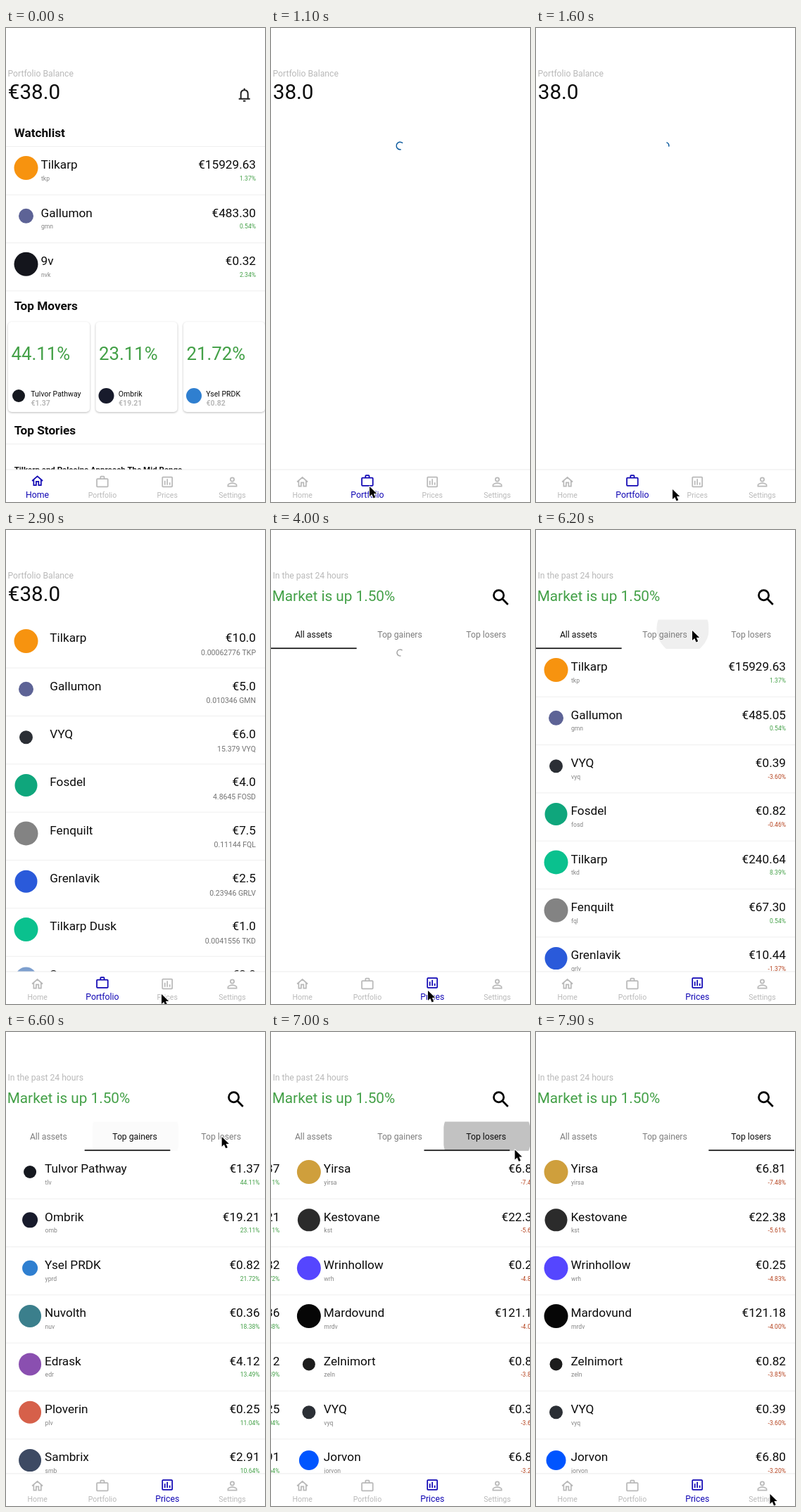
An HTML page with a canvas that plays this animation: 368x674 px, repeating every 8 s.

```html
<!DOCTYPE html>
<html lang="en">
<head>
<meta charset="utf-8">
<title>Portfolio app</title>
<style>
html, body { margin: 0; width: 100%; height: 100%; overflow: hidden; background: #fff; }
canvas { display: block; width: 368px; height: 674px; }
</style>
</head>
<body>
<canvas id="stage"></canvas>
<script>
const W = 368, H = 674, LOOP = 8000, PITCH = 68.35, NAV_TOP = 628;
const canvas = document.getElementById('stage');
const ctx = canvas.getContext('2d');
const ratio = window.devicePixelRatio || 1;
canvas.width = W * ratio;
canvas.height = H * ratio;

const BLACK = '#0c0c0c', GREEN = '#43a047', RED = '#b5431f', BLUE = '#1006b4', PALE = '#b9b9b9';

// Badge per asset: colour and radius
const BADGES = {
  tkp: ['#f7930f', 17], gmn: ['#5d6396', 10.5], nvk: ['#14151c', 17], vyq: ['#2b2f35', 9.5],
  fosd: ['#0fa67c', 16], fql: ['#838383', 17], grlv: ['#2a5ada', 16], tkd: ['#0ac18e', 17],
  srv: ['#7d9fce', 15], yirsa: ['#cf9f3c', 17], kst: ['#2b2b2b', 16], wrh: ['#5546ff', 17],
  mrdv: ['#060606', 17], zeln: ['#1c1c1c', 9], jorvon: ['#0055ff', 14],
  tlv: ['#15181f', 9], omb: ['#181b2c', 11], yprd: ['#2f7fd0', 11],
  nuv: ['#3b7f8c', 16], edr: ['#8a4fb0', 16], plv: ['#d6604a', 16], smb: ['#3d4a63', 16]
};

const table = lines => lines.trim().split('\n').map(line => line.trim().split('|'));

const WATCHLIST = table(`
  Tilkarp|tkp|15929.63|1.37
  Gallumon|gmn|483.30|0.54
  9v|nvk|0.32|2.34`);
const HOLDINGS = table(`
  Tilkarp|tkp|10.0|0.00062776
  Gallumon|gmn|5.0|0.010346
  VYQ|vyq|6.0|15.379
  Fosdel|fosd|4.0|4.8645
  Fenquilt|fql|7.5|0.11144
  Grenlavik|grlv|2.5|0.23946
  Tilkarp Dusk|tkd|1.0|0.0041556
  Sorvane|srv|2.0|21.604`);
const MOVERS = table(`
  Tulvor Pathway|tlv|1.37|44.11
  Ombrik|omb|19.21|23.11
  Ysel PRDK|yprd|0.82|21.72`);
const PAGES = [table(`
  Tilkarp|tkp|15929.63|1.37
  Gallumon|gmn|485.05|0.54
  VYQ|vyq|0.39|-3.60
  Fosdel|fosd|0.82|-0.46
  Tilkarp|tkd|240.64|8.39
  Fenquilt|fql|67.30|0.54
  Grenlavik|grlv|10.44|-1.37`),
  MOVERS.concat(table(`
  Nuvolth|nuv|0.36|18.38
  Edrask|edr|4.12|13.49
  Ploverin|plv|0.25|11.04
  Sambrix|smb|2.91|10.64`)), table(`
  Yirsa|yirsa|6.81|-7.48
  Kestovane|kst|22.38|-5.61
  Wrinhollow|wrh|0.25|-4.83
  Mardovund|mrdv|121.18|-4.00
  Zelnimort|zeln|0.82|-3.85
  VYQ|vyq|0.39|-3.60
  Jorvon|jorvon|6.80|-3.20`)];

// Stroked icons on a 24-unit grid
const ICONS = {
  home: 'M3.4 12 12 4.3l8.6 7.7M6 10v9h4v-6h4v6h4v-9',
  work: 'M4 7h16q1 0 1 1v11q0 1-1 1H4q-1 0-1-1V8q0-1 1-1zM9 7V4q0-1 1-1h4q1 0 1 1v3',
  chart: 'M5 4h14q1 0 1 1v14q0 1-1 1H5q-1 0-1-1V5q0-1 1-1zM8 10v7M12 7v10M16 13v4',
  person: 'M12 5a3 3 0 1 0 0 6 3 3 0 1 0 0-6M5 19v-2c0-1.5 4-3 7-3s7 1.5 7 3v2z',
  bell: 'M4 18h16M7 18v-7c0-3.5 2-5.5 5-5.5s5 2 5 5.5v7M12 5.5V3M10.3 21h3.4',
  search: 'M9.5 4a5.5 5.5 0 1 0 0 11 5.5 5.5 0 1 0 0-11M13.6 13.6l6.1 6.1'
};
const NAV = [['Home', 'home'], ['Portfolio', 'work'], ['Prices', 'chart'], ['Settings', 'person']];
const TABS = ['All assets', 'Top gainers', 'Top losers'];
const TAB_W = W / 3;

// Pointer path: time, x, y
const POINTER = [
  [500, 150, 690], [900, 140, 652], [1150, 140, 652], [1600, 194, 656], [1900, 221, 660],
  [3500, 221, 660], [3800, 223, 655], [4600, 223, 655], [4900, 226, 652], [5050, 226, 652],
  [5850, 222, 143], [6300, 222, 143], [6700, 322, 150], [7000, 346.5, 167.5], [7300, 344, 170],
  [7450, 344, 170], [7900, 332.5, 657], [LOOP, 332.5, 657]
];

const T = { portfolio: 1100, holdings: 1800, prices: 3800, assets: 4600, gainers: 6300, losers: 6765 };

const clamp = v => Math.max(0, Math.min(1, v));
const mix = (a, b, k) => a + (b - a) * k;
const smooth = k => k * k * (3 - 2 * k);
const easeOut = (t, start) => 1 - (1 - clamp((t - start) / 400)) ** 3;

function text(str, x, y, size, color = BLACK, align = 'left', weight = 400) {
  ctx.font = `${weight} ${size}px Roboto, sans-serif`;
  ctx.textAlign = align;
  ctx.fillStyle = color;
  ctx.fillText(str, x, y);
}

function rect(x, y, w, h, color) {
  ctx.fillStyle = color;
  ctx.fillRect(x, y, w, h);
}

function disc(x, y, r, color) {
  ctx.fillStyle = color;
  ctx.beginPath();
  ctx.arc(x, y, r, 0, 7);
  ctx.fill();
}

function clipped(x, y, w, h, draw) {
  ctx.save();
  ctx.beginPath();
  ctx.rect(x, y, w, h);
  ctx.clip();
  draw();
  ctx.restore();
}

function icon(name, x, y, scale, color, width = 2) {
  ctx.save();
  ctx.translate(x, y);
  ctx.scale(scale, scale);
  ctx.translate(-12, -12);
  ctx.strokeStyle = color;
  ctx.lineWidth = width;
  ctx.stroke(new Path2D(ICONS[name]));
  ctx.restore();
}

function badge(id, x, y, alpha = 1) {
  const [color, r] = BADGES[id];
  ctx.globalAlpha = alpha;
  disc(x, y, r, color);
  ctx.globalAlpha = 1;
}

const divider = y => rect(0, y, W, 1, '#efefef');

function header(label, value, x, size, color) {
  text(label, 2.4, 69, 12.2, PALE);
  text(value, x, 101.2, size, color);
}

const balance = value => header('Portfolio Balance', value, 2.8, 29.6);

function quoteRows(rows) {
  rows.forEach(([name, id, price, change], i) => {
    const y = 168.3 + i * PITCH;
    badge(id, 28.5, y + 30.7);
    text(name, 49.5, y + 32, 17.2);
    text(id, 50, y + 48.6, 8.6, '#858585');
    text('€' + price, 355, y + 32, 17.2, BLACK, 'right');
    text(change + '%', 355, y + 48.6, 8.6, change < 0 ? RED : GREEN, 'right');
    divider(y + PITCH);
  });
}

function moverCard([name, id, price, change], i) {
  const x = 3 + i * 124.5;
  ctx.save();
  ctx.shadowColor = 'rgba(0,0,0,.27)';
  ctx.shadowBlur = 3 * ratio;
  ctx.shadowOffsetY = ratio;
  ctx.fillStyle = '#fff';
  ctx.beginPath();
  ctx.roundRect(x, 418, 116, 128, 5);
  ctx.fill();
  ctx.restore();
  text(change + '%', x + 4.4, 472, 25.8, GREEN);
  badge(id, x + 15, 523);
  text(name, x + 32.3, 524, 10.5);
  text('€' + price, x + 32.6, 537, 10.5, PALE, 'left', 700);
}

function homeScreen() {
  balance('€38.0');
  icon('bell', 338.7, 94.8, 1, '#222');
  text('Watchlist', 11.7, 155, 17.2, BLACK, 'left', 700);
  divider(168);
  quoteRows(WATCHLIST);
  text('Top Movers', 11.7, 401, 17.2, BLACK, 'left', 700);
  MOVERS.forEach(moverCard);
  text('Top Stories', 11.7, 578, 17.2, BLACK, 'left', 700);
  divider(591);
  text('Tilkarp and Palcoins Approach The Mid Range', 11.7, 632, 11.5, BLACK, 'left', 700);
}

function spinner(t, ref, x, y, r, color) {
  const start = -1.2 + (t - ref) * 0.0075;
  const sweep = 1.4 + 1.6 * (1 - Math.cos((t - ref) * 0.0047));
  ctx.strokeStyle = color;
  ctx.lineWidth = 1.5;
  ctx.beginPath();
  ctx.arc(x, y, r, start, start + sweep);
  ctx.stroke();
}

function portfolioScreen(t) {
  const loaded = t >= T.holdings;
  balance((loaded ? '€' : '') + '38.0');
  if (!loaded) return spinner(t, 1600, 183.5, 167.5, 5.3, '#0b5a9e');
  HOLDINGS.forEach(([name, id, value, amount], i) => {
    const y = 127.3 + i * PITCH;
    badge(id, 28.5, y + 30.7, clamp((t - T.holdings) / 300));
    text(name, 62.3, y + 32, 17.2);
    text('€' + value, 355, y + 32, 17.2, BLACK, 'right');
    text(`${amount} ${id.toUpperCase()}`, 355, y + 50.6, 10.5, '#737373', 'right');
    divider(y + PITCH);
  });
}

// Touch feedback that grows from the pointer to the middle of a tab, then fades
function ripple(t, start, tab, x, y) {
  const age = t - start;
  if (age < 0 || age > 570) return;
  const k = clamp(age / 260);
  const middle = (tab + 0.5) * TAB_W;
  clipped(tab * TAB_W, 127.5, TAB_W, 41.5, () => {
    ctx.globalAlpha = 0.24 * k ** 2.6 * (1 - clamp((age - 320) / 250));
    disc(mix(x, middle, k * k), mix(y, 148, k * k), 63 * k, '#000');
    ctx.globalAlpha = 1;
  });
}

function pricesScreen(t) {
  header('In the past 24 hours', 'Market is up 1.50%', 1.7, 20.75, GREEN);
  icon('search', 326.8, 96, 1.29, '#000', 2.1);
  ripple(t, 6047, 1, 222, 136);
  ripple(t, 6700, 2, 322, 150);

  const active = t >= T.losers ? 2 : t >= T.gainers ? 1 : 0;
  TABS.forEach((label, i) =>
    text(label, (i + 0.5) * TAB_W - 1, 153, 12.2, i === active ? BLACK : '#7d7d7d', 'center'));

  if (t < T.assets) {
    spinner(t, 4500, 183.5, 174.5, 4.5, '#a5a5a5');
  } else {
    const page = easeOut(t, T.gainers) + easeOut(t, T.losers);
    clipped(0, 169, W, NAV_TOP - 169, () => PAGES.forEach((rows, i) => {
      const x = (i - page) * W;
      if (Math.abs(x) >= W) return;
      ctx.save();
      ctx.translate(x, 0);
      quoteRows(rows);
      ctx.restore();
    }));
  }
  // The underline trails the page slightly
  const mark = easeOut(t, T.gainers + 80) + easeOut(t, T.losers + 80);
  rect(mark * TAB_W, 167.4, TAB_W - 1, 1.7, '#111');
}

function navBar(active) {
  rect(0, NAV_TOP, W, H - NAV_TOP, '#fff');
  rect(0, NAV_TOP - 0.5, W, 1, '#ececec');
  NAV.forEach(([label, name], i) => {
    const on = i === active, x = 44.6 + i * 92.3;
    const color = on ? BLUE : PALE;
    icon(name, x, on ? 644 : 645.5, 0.87, color);
    text(label, x, on ? 667.7 : 668, on ? 12.25 : 10.5, color, 'center');
  });
}

function pointer(t) {
  const i = POINTER.findIndex(p => p[0] > t);
  if (i < 1) return;
  const [t0, x0, y0] = POINTER[i - 1], [t1, x1, y1] = POINTER[i];
  const k = smooth((t - t0) / (t1 - t0));
  ctx.save();
  ctx.translate(mix(x0, x1, k), mix(y0, y1, k));
  const arrow = new Path2D('M0 0V14L3.2 11 5.6 16.4 8.2 15.3 5.9 10H10.2z');
  ctx.lineJoin = 'round';
  ctx.lineWidth = 2;
  ctx.strokeStyle = '#fff';
  ctx.stroke(arrow);
  ctx.fillStyle = '#000';
  ctx.fill(arrow);
  ctx.restore();
}

function render(t) {
  ctx.setTransform(ratio, 0, 0, ratio, 0, 0);
  rect(0, 0, W, H, '#fff');
  const screen = t >= T.prices ? 2 : t >= T.portfolio ? 1 : 0;
  [homeScreen, portfolioScreen, pricesScreen][screen](t);
  navBar(screen);
  pointer(t);
}

const began = performance.now();
function tick() {
  render((performance.now() - began) % LOOP);
  requestAnimationFrame(tick);
}
tick();
</script>
</body>
</html>
```
